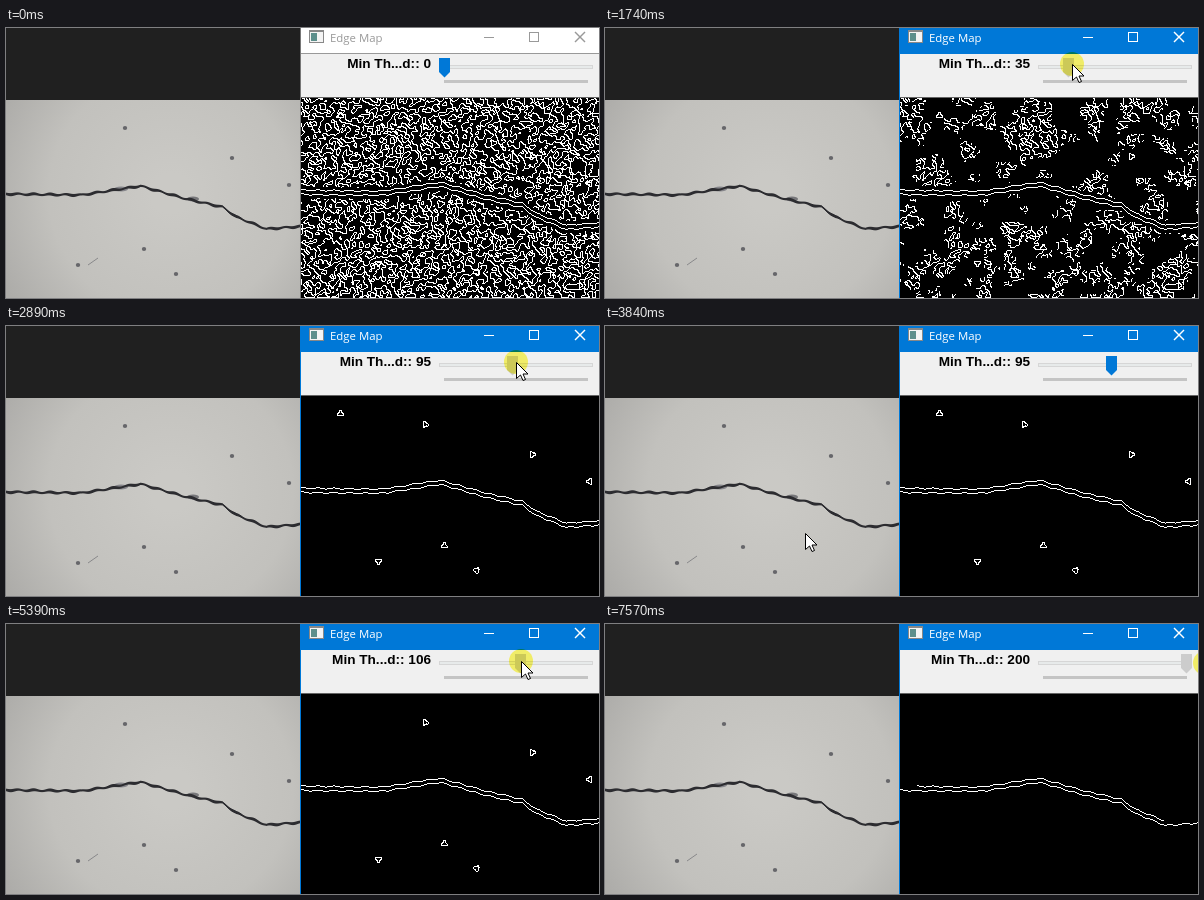
Animation of 593x270 px, one loop 8000 ms. Source, as an HTML page with a canvas:

```html
<!DOCTYPE html>
<html lang="en">
<head>
<meta charset="utf-8">
<title>Edge Map</title>
<style>
  html, body { margin: 0; width: 100%; height: 100%; overflow: hidden; background: #202020; }
  canvas { display: block; }
</style>
</head>
<body>
<canvas id="stage" width="593" height="270"></canvas>
<script>
const ctx = document.getElementById('stage').getContext('2d');
const LOOP = 8000, MAP_X = 295, MAP_Y = 70, W = 298, H = 200;
const SHIFT_X = 300 - MAP_X, SHIFT_Y = -2 - MAP_Y;   // photo to edge map
const TRACK_X = 438, PX_PER_UNIT = 0.715;
const BLUE = '#0078d7';

// Mouse moves: start ms, end ms, destination x and y
const MOVES = [
  [290, 1050, 442, 35], [1290, 1970, 479, 36], [1970, 2850, 510, 36],
  [3330, 3830, 196, 209], [3830, 4680, 497, 52], [4680, 5000, 507, 38],
  [5090, 5390, 515, 37], [5760, 6570, 562, 37], [6620, 7260, 608, 39], [7569, 7570, 600, 39]];
const CRACK = [[0, 166], [75, 167], [134, 158], [180, 171], [216, 179], [230, 189], [260, 201], [300, 198]];
// Pits in the surface, faintest first
const PITS = [[34, 89], [119, 100], [226, 130], [72, 237], [170, 246], [283, 157], [138, 221]];

const clamp = (v, lo, hi) => Math.min(hi, Math.max(lo, v));
const lerp = (a, b, f) => a + (b - a) * f;

let seed = 7;
function random() {
  seed = (seed * 1664525 + 1013904223) >>> 0;
  return seed / 4294967296;
}

function crackY(x) {
  const i = clamp(CRACK.findIndex(p => p[0] > x), 1, CRACK.length - 1);
  const [x0, y0] = CRACK[i - 1], [x1, y1] = CRACK[i];
  return lerp(y0, y1, (x - x0) / (x1 - x0)) + 0.6 * Math.sin(x * 0.4);
}

// Blurred noise with a standard deviation of about 1.
function noiseField() {
  let field = Float32Array.from({ length: W * H }, () => (random() - 0.5) / 0.065);
  for (let pass = 0; pass < 3; pass++)
    for (const step of [1, W])
      field = field.map((v, i, f) => ((f[i - step] ?? v) + 2 * v + (f[i + step] ?? v)) / 4);
  return field;
}

// Highest threshold at which each pixel of the edge map still shows.
function buildStrength() {
  const strength = new Float32Array(W * H);
  const texture = noiseField(), patches = noiseField();
  const plot = (x, y, value) => {
    x = Math.round(x); y = Math.round(y);
    if (x >= 0 && x < W && y >= 0 && y < H) strength[y * W + x] = value;
  };
  for (let x = 0; x < W; x++) {
    const middle = crackY(x - SHIFT_X) + SHIFT_Y;
    for (let y = 0; y < H; y++) {
      const i = y * W + x, inside = texture[i] > 0;
      const isEdge = inside !== texture[i + 1] > 0 || inside !== texture[i + W] > 0;
      if (isEdge && Math.abs(y - middle) > 6)
        plot(x, y, clamp(30 + 21 * patches[(y >> 2) * W + (x >> 2)], 1, 92));
    }
    const weak = x < 17 || x > 263;
    plot(x, middle - 2.3, weak ? 185 : 255);
    plot(x, middle + 2, 255);
  }
  PITS.forEach(([px, py], n) => {
    for (let a = 0; a < 6; a += 0.12) {
      const r = 2.4 + 0.8 * Math.sin(3 * a + n);
      plot(px + SHIFT_X + r * Math.cos(a), py + SHIFT_Y + r * Math.sin(a), 98 + 13 * n);
    }
  });
  return strength;
}

const strength = buildStrength();
const edges = ctx.createImageData(W, H);
const edgePixels = new Uint32Array(edges.data.buffer);

function drawEdges(threshold) {
  strength.forEach((s, i) => { edgePixels[i] = s > threshold ? 0xffffffff : 0xff000000; });
  ctx.putImageData(edges, MAP_X, MAP_Y);
}

function rect(color, x, y, w, h) {
  ctx.fillStyle = color;
  ctx.fillRect(x, y, w, h);
}

function polygon(points, fill, stroke = fill, width = 0.01) {
  ctx.beginPath();
  points.forEach(([x, y]) => ctx.lineTo(x, y));
  ctx.closePath();
  ctx.fillStyle = fill;
  ctx.fill();
  ctx.strokeStyle = stroke;
  ctx.lineWidth = width;
  ctx.stroke();
}

function line(color, width, x0, y0, x1, y1) {
  ctx.strokeStyle = color;
  ctx.lineWidth = width;
  ctx.beginPath();
  ctx.moveTo(x0, y0);
  ctx.lineTo(x1, y1);
  ctx.stroke();
}

function ellipse(color, x, y, rx, ry = rx) {
  ctx.fillStyle = color;
  ctx.beginPath();
  ctx.ellipse(x, y, rx, ry, 0, 0, 7);
  ctx.fill();
}

function text(string, font, color, align, x, y) {
  ctx.font = font;
  ctx.fillStyle = color;
  ctx.textAlign = align;
  ctx.fillText(string, x, y);
}

function drawPhoto() {
  const tone = ctx.createRadialGradient(165, 165, 20, 165, 165, 190);
  tone.addColorStop(0, '#cac9c5');
  tone.addColorStop(0.6, '#c2c1bd');
  tone.addColorStop(1, '#adaca9');
  rect(tone, 0, 72, 294, 198);
  ellipse('#85858a', 115, 161, 7, 2.5);
  ellipse('#77777a', 187, 171, 6, 2.5);
  PITS.slice(1).forEach(([x, y]) => ellipse('#66666a', x, y, 2.2, 2));
  line('#88888a', 1, 82, 237, 92, 230);
  for (let x = 0; x < 294; x++) {
    const thick = 2.6 + 0.5 * Math.sin(x * 0.31);
    rect('#2c2c30', x, crackY(x) - thick / 2, 1, thick);
  }
}

function drawTitleBar(active) {
  const ink = active ? '#fff' : '#999';
  rect(active ? BLUE : '#fff', 295, 0, 298, 25);
  rect(active ? BLUE : '#999', 295, 25, 298, 1);
  rect(active ? BLUE : '#777', 294, 0, 1, 270);
  rect('#888', 303, 2, 15, 13);
  rect('#f4f4f4', 304, 4, 13, 10);
  rect('#5d8f8c', 305, 5, 6, 8);
  text('Edge Map', '11.4px "Open Sans", "Noto Sans", sans-serif', ink, 'left', 324, 14);
  line(ink, 1, 478, 9.5, 488, 9.5);
  line(ink, 1.4, 569, 4, 579, 14);
  line(ink, 1.4, 579, 4, 569, 14);
  ctx.lineWidth = 1;
  ctx.strokeRect(523.5, 4.5, 9, 9);
}

function drawSlider(value, thumbColor, focused) {
  rect('#f0f0f0', MAP_X, 26, W, 43);
  rect('#646464', MAP_X, 69, W, 1);
  text('Min Th...d:: ' + value, 'bold 13.6px "Liberation Sans", Arial, sans-serif', '#000', 'right', 425, 40);
  rect('#d6d6d6', 433, 37, 154, 4);
  rect('#e7eaea', 434, 38, 152, 2);
  rect('#c4c4c4', 438, 52, 144, 3);
  if (focused) {
    ctx.setLineDash([1, 1]);
    line('#000', 1, 425, 27.5, 593, 27.5);
    line('#000', 1, 425, 64.5, 593, 64.5);
    line('#000', 1, 425.5, 27, 425.5, 65);
    ctx.setLineDash([]);
  }
  const x = Math.round(TRACK_X + value * PX_PER_UNIT);
  polygon([[x - 5, 30], [x + 6, 30], [x + 6, 44], [x + 0.5, 49.5], [x - 5, 44]], thumbColor);
}

function drawPointer(x, y, pressed) {
  if (pressed) {
    ctx.globalCompositeOperation = 'multiply';
    ellipse('#fffb6e', x, y, 12);
    ctx.globalCompositeOperation = 'source-over';
  }
  const arrow = [[0, 0], [0, 16], [4, 12.5], [6.5, 18], [9, 17], [6.5, 11.5], [11.5, 11.5]];
  polygon(arrow.map(([dx, dy]) => [x + dx + 0.5, y + dy + 0.5]), '#fff', '#000', 1);
}

function mouseAt(time) {
  let x = 518, y = 272;
  for (const [start, end, toX, toY] of MOVES) {
    const f = clamp((time - start) / (end - start), 0, 1);
    x = lerp(x, toX, f);
    y = lerp(y, toY, f);
  }
  return [Math.round(x), Math.round(y)];
}

function thresholdAt(time, x) {
  if (time < 1280) return 0;
  if (time >= 2850 && time < 5090) return 95;
  const grip = time < 2850 ? 4 : 0.9;
  return clamp(Math.round((x - grip - TRACK_X) / PX_PER_UNIT), 0, 200);
}

function draw(now) {
  const time = now % LOOP;
  const [x, y] = mouseAt(time);
  const pressed = (time >= 1280 && time < 3210) || time >= 5090;
  const value = thresholdAt(time, x);
  const overThumb = Math.abs(x - TRACK_X - value * PX_PER_UNIT) < 6 && y >= 30 && y < 49;

  rect('#202020', 0, 0, 294, 72);
  drawPhoto();
  drawTitleBar(time >= 1280);
  drawSlider(value, pressed ? '#ccc' : overThumb ? '#171717' : BLUE, pressed && value === 0);
  drawEdges(value);
  drawPointer(x, y, pressed);
  requestAnimationFrame(draw);
}
requestAnimationFrame(draw);
</script>
</body>
</html>
```
